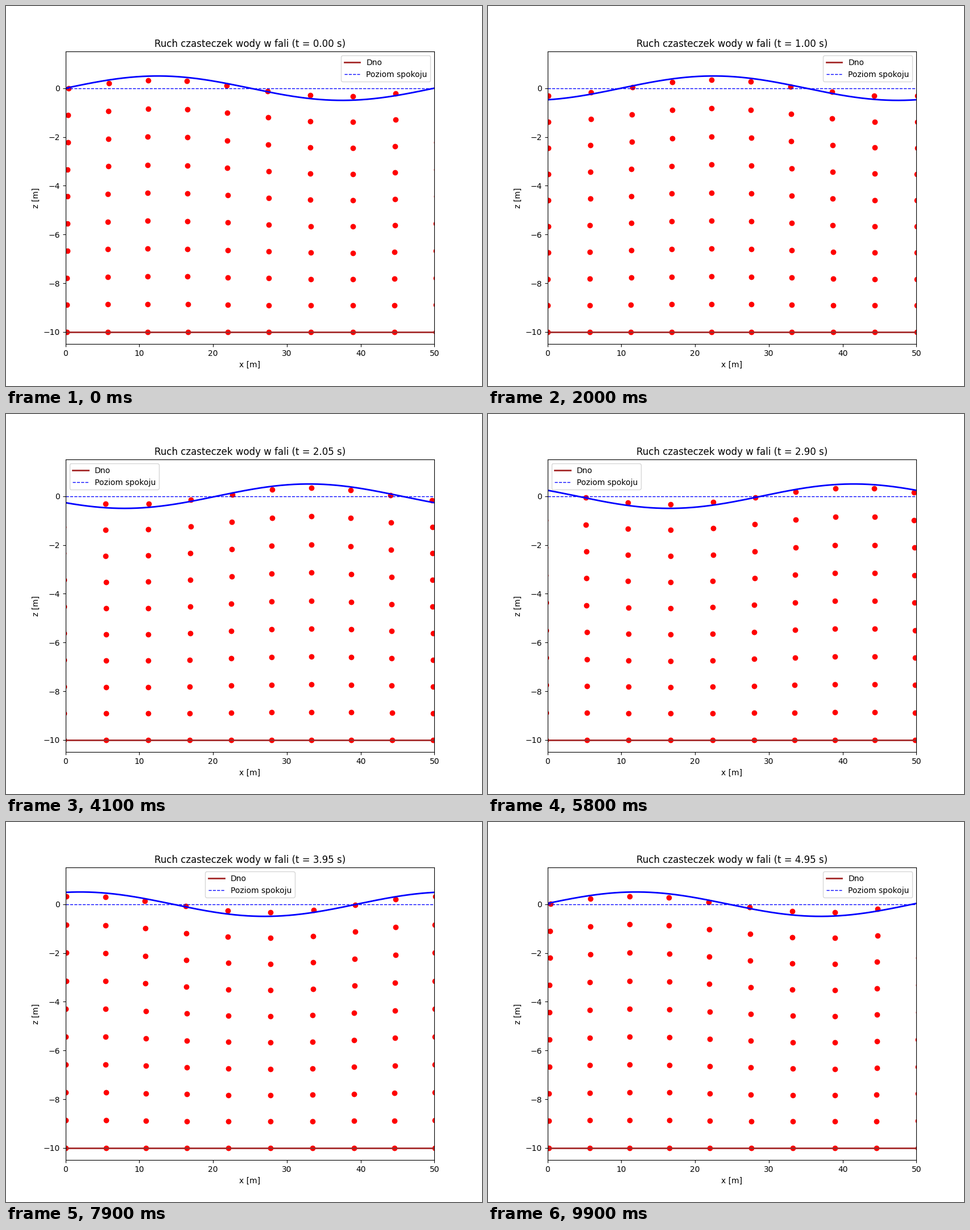
Recreate the animation shown at these times as a matplotlib script. Size 837 by 669 pixels, loop 10 s.

```python
import numpy as np
import matplotlib.pyplot as plt
from matplotlib.animation import FuncAnimation

AMP, LENGTH, PERIOD, DEPTH, G = 0.5, 50, 5, 10, 9.81
FRAMES, STEP = 100, 0.05

k = 2 * np.pi / LENGTH
omega = 2 * np.pi / PERIOD

x = np.linspace(0, LENGTH, 500)
x0, z0 = np.meshgrid(np.linspace(0, LENGTH, 10), np.linspace(-DEPTH, 0, 10))

# Semi-axes of the elliptical orbits shrink with depth
scale = AMP * G * k / omega**2 / np.cosh(k * DEPTH)
rx = scale * np.cosh(k * (z0 + DEPTH))
rz = scale * np.sinh(k * (z0 + DEPTH))

# The small excess keeps the pixel size from rounding down
fig, ax = plt.subplots(figsize=(8.3701, 6.6901), dpi=100)
ax.set_xlim(0, LENGTH)
ax.set_ylim(-DEPTH - 0.5, 1.5)
ax.set_xlabel("x [m]")
ax.set_ylabel("z [m]")
title = ax.set_title("")

particles, = ax.plot([], [], "ro", ms=6)
surface, = ax.plot([], [], "b-", lw=2)
ax.axhline(-DEPTH, color="brown", lw=2, label="Dno")
ax.axhline(0, color="blue", ls="--", lw=1, label="Poziom spokoju")
ax.legend(loc="best")


def update(i):
    t = i * STEP
    phase = k * x0 - omega * t
    surface.set_data(x, AMP * np.sin(k * x - omega * t))
    particles.set_data((x0 + rx * np.cos(phase)).ravel(),
                       (z0 + rz * np.sin(phase)).ravel())
    title.set_text(f"Ruch czasteczek wody w fali (t = {t:.2f} s)")
    return surface, particles, title


anim = FuncAnimation(fig, update, frames=FRAMES, interval=100,
                     repeat=True, repeat_delay=0, blit=False)
plt.show()
```
